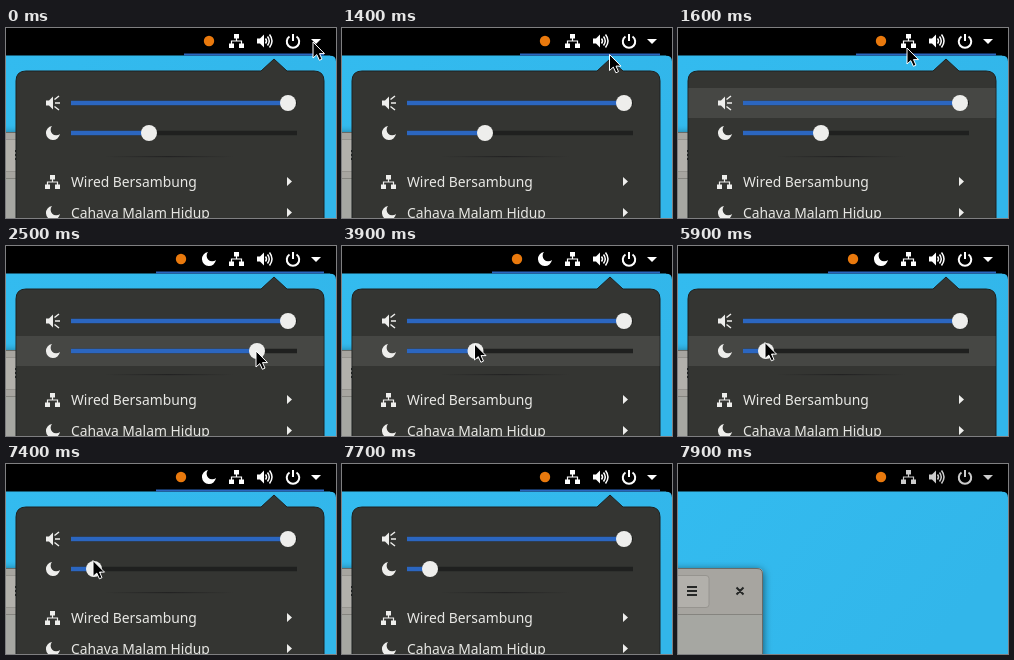
Write an HTML page that moves like this. It is 330 px wide and 190 px high and loops after 8000 ms.

```html
<!DOCTYPE html>
<html lang="id">
<head>
<meta charset="utf-8">
<style>
html, body { margin: 0; width: 100%; height: 100%; overflow: hidden; background: #000; }
svg { display: block; }
text { font: 13.85px "Noto Sans", sans-serif; fill: #e8e8e5; }
.line { fill: none; stroke: currentColor; stroke-width: 1.5; }
</style>
</head>
<body>
<svg width="330" height="190" viewBox="0 0 330 190">
  <defs>
    <linearGradient id="sky" x2="1" y2=".4">
      <stop stop-color="#33bbef"/><stop offset="1" stop-color="#32b6ea"/>
    </linearGradient>
    <linearGradient id="fade">
      <stop stop-color="#222" stop-opacity="0"/><stop offset=".5" stop-color="#222"/>
      <stop offset="1" stop-color="#222" stop-opacity="0"/>
    </linearGradient>
    <filter id="shadow" x="-20%" y="-20%" width="140%" height="140%">
      <feDropShadow dx="0" dy="2" stdDeviation="4" flood-opacity=".6"/>
    </filter>
    <!-- icons are centred on 0,0 -->
    <path id="moon" d="M-1-6.9A7 7 0 1 0 6.9 1A5.6 5.6 0 0 1-1-6.9Z"/>
    <g id="network">
      <path d="M-2.5-7H2.5V-2.5H-2.5ZM-7.5 2.5H-2.5V7H-7.5ZM2.5 2.5H7.5V7H2.5Z"/>
      <path class="line" d="M0-3V0M-5 3V0H5V3" style="stroke-width:1.2"/>
    </g>
    <path id="horn" d="M-8-2.5H-5L-1-6.5V6.5L-5 2.5H-8Z"/>
  </defs>

  <rect y="27.5" width="330" height="163" fill="url(#sky)"/>
  <path d="M324 27H330V33.5Q330 27.5 324 27.5Z"/>

  <g filter="url(#shadow)">
    <path d="M-20 104H79Q85 104 85 110V200H-20Z" fill="#a6a7a2"/>
    <path d="M-20 104H79Q85 104 85 110V150H-20Z" fill="#a7a5a0"/>
  </g>
  <path d="M0 104.5H79Q84.5 104.5 84.5 110V190" fill="none" stroke="#686a66"/>
  <path d="M0 150.5H84" stroke="#85847f"/>
  <rect x="-8" y="111.5" width="39" height="32" rx="3" fill="#b2b0ab" stroke="#96948f"/>
  <path d="M9 123H19M9 127H19M9 131H19M58.5 123.5L65.5 130.5M65.5 123.5L58.5 130.5"
        stroke="#252726" stroke-width="2"/>

  <g id="menu" fill="#eeeeec" color="#eeeeec">
    <path d="M10 200V53Q10 43 20 43H255L268 31L281 43H308Q318 43 318 53V200Z"
          fill="#343532" stroke="#1d2120"/>
    <rect id="hover" x="10.5" width="307" height="30" fill="#464744"/>
    <use href="#horn" x="48" y="75"/>
    <path class="line" d="M49 75H54M48.5 71.5L53 68M48.5 78.5L53 82"/>
    <use href="#moon" x="47" y="105"/>
    <path d="M65 75H291M65 105H291" stroke="#1f201f" stroke-width="4.6"/>
    <path id="fills" stroke="#2b66c0" stroke-width="4.6"/>
    <circle cx="282" cy="75" r="8"/>
    <circle id="knob" cy="105" r="8"/>
    <rect x="98" y="128" width="130" height="1.2" fill="url(#fade)"/>
    <use href="#network" x="46.5" y="154"/>
    <use href="#moon" x="47" y="185"/>
    <text x="65" y="159">Wired Bersambung</text>
    <text x="65" y="189.5">Cahaya Malam Hidup</text>
    <path d="M281 149L286 153.5L281 158ZM281 180L286 184.5L281 189Z"/>
  </g>

  <rect id="underline" y="25.5" height="2" fill="#2a66c0"/>
  <circle id="dot" cy="13" r="5.2" fill="#e9790d"/>
  <g id="status" fill="currentColor">
    <use id="night" href="#moon" x="203" y="13"/>
    <use href="#network" x="230.5" y="13"/>
    <use href="#horn" x="259" y="13"/>
    <path class="line" d="M259.5 10.5Q261.5 13 259.5 15.5M261.5 8.5Q265 13 261.5 17.5M263.5 6.5Q268.5 13 263.5 19.5"/>
    <path class="line" d="M283.5 8.5A6.2 6.2 0 1 0 290.5 8.5M287 6V13" style="stroke-width:2"/>
    <path d="M305 11H315L310 16Z"/>
  </g>

  <path id="cursor" d="M0 0V16L3.8 12.6L6.4 18.3L9 17.1L6.5 11.6H11.5Z"
        stroke="#fff" stroke-linejoin="round"/>
</svg>
<script>
const LOOP = 8000, FRAME = 100;
const NIGHT_ON = 2500, NIGHT_OFF = 7600, MENU_CLOSE = 7900;
const $ = id => document.getElementById(id);
const set = (id, attrs) => {
  for (const name in attrs) $(id).setAttribute(name, attrs[name]);
};

const home = { x: 307, y: 14 };
const moves = [
  { start: 900, frames: 1, x: 306, y: 33 },
  { start: 1400, frames: 3, x: 229, y: 20 },
  { start: 1700, frames: 3, x: 250, y: 105 },
  { start: 3300, frames: 4, x: 132.5, y: 98 },
  { start: 4500, frames: 3, x: 232, y: 98 },
  { start: 5600, frames: 3, x: 87, y: 96.5 },
  { start: 7500, frames: 3, x: 400, y: 150 }
];
const presses = [NIGHT_ON, 3900, 4900, 5900];

// The pointer eases out of each move, advancing once per recorded frame.
function pointerAt(t) {
  let { x, y } = home;
  for (const move of moves) {
    const step = Math.floor((t - move.start) / FRAME) + 1;
    const progress = Math.min(1, Math.max(0, step / move.frames));
    const eased = Math.sin(progress * Math.PI / 2);
    x += (move.x - x) * eased;
    y += (move.y - y) * eased;
  }
  return { x, y };
}

// The slider jumps to wherever the pointer last pressed.
function brightnessAt(t) {
  const press = presses.findLast(time => time <= t);
  return press ? pointerAt(press).x + 1 : 143;
}

// The highlight runs one frame ahead of the drawn pointer.
function hoverRowAt(t) {
  const { x, y } = pointerAt(t + FRAME);
  const row = Math.floor((y - 30) / 30);
  return x < 318 && (row === 1 || row === 2) ? row : 0;
}

function draw() {
  const t = performance.now() % LOOP;
  const { x, y } = pointerAt(t);
  const level = brightnessAt(t);
  const row = hoverRowAt(t);
  const night = t >= NIGHT_ON && t < NIGHT_OFF;
  const open = t < MENU_CLOSE;
  const left = night ? 150 : 178;

  set("cursor", { transform: `translate(${x} ${y})` });
  set("knob", { cx: level });
  set("fills", { d: `M65 75H282M65 105H${level}` });
  set("hover", { y: 30 + row * 30, opacity: row ? 1 : 0 });
  set("menu", { visibility: open ? "visible" : "hidden" });
  set("underline", { x: left, width: 318 - left, opacity: open ? 1 : 0 });
  set("dot", { cx: left + 25 });
  set("night", { opacity: night ? 1 : 0 });
  set("status", { color: open ? "#fff" : "#ccc" });
  requestAnimationFrame(draw);
}
draw();
</script>
</body>
</html>
```
